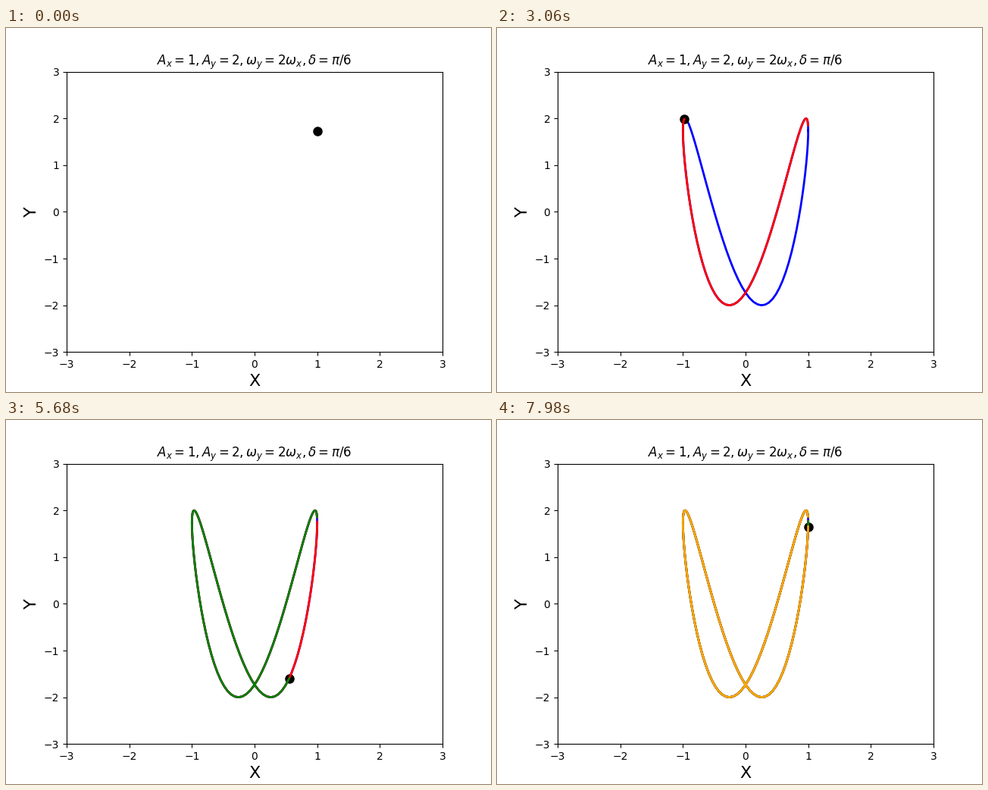
Write a matplotlib script that moves like this. It is 640 px wide and 480 px high and loops after 8 s.

```python
import numpy as np
import matplotlib.pyplot as plt
from matplotlib.animation import FuncAnimation

FRAMES = 400
LAP = 100
COLORS = ["blue", "red", "green", "orange"]

# Lissajous curve over ten turns; the first four are shown
t = np.linspace(0, 20 * np.pi, 1000)
x = np.cos(t)
y = 2 * np.cos(2 * t - np.pi / 6)

fig, ax = plt.subplots(figsize=(6.4, 4.8), dpi=100)
ax.set_xlim(-3, 3)
ax.set_ylim(-3, 3)
ax.set_xlabel("X", fontsize=16)
ax.set_ylabel("Y", fontsize=16)
ax.set_title(r"$A_x = 1, A_y = 2, \omega_y = 2\omega_x, \delta = \pi/6$")

# The dot lies above the first lap and below the later ones
trails = [ax.plot([], [], color=c, lw=2, zorder=2 if k == 0 else 4)[0]
          for k, c in enumerate(COLORS)]
dot, = ax.plot([], [], "o", color="black", ms=8, zorder=3)


def update(i):
    for k, trail in enumerate(trails):
        start = k * LAP + 1 if k else 0
        stop = min(i, (k + 1) * LAP) + 1
        trail.set_data(x[start:stop], y[start:stop])
    dot.set_data([x[i]], [y[i]])
    return [*trails, dot]


anim = FuncAnimation(fig, update, frames=FRAMES, interval=20,
                     blit=True, repeat=True, repeat_delay=0)
plt.show()
```
